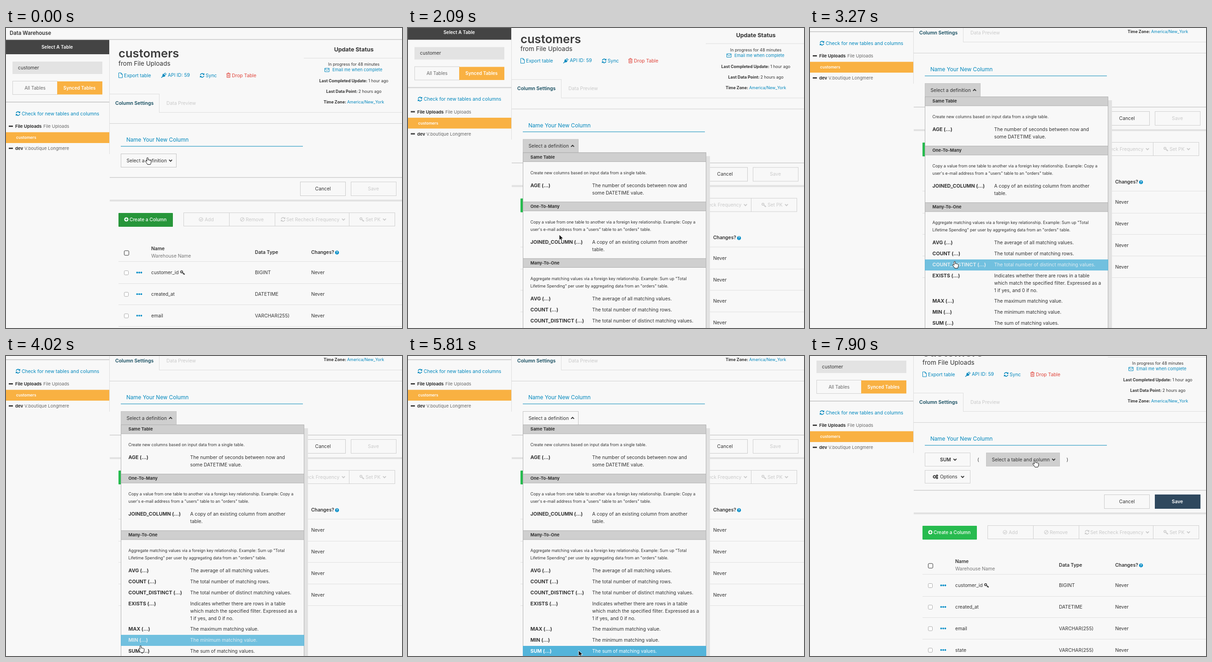
Write an HTML page that moves like this. It is 859x652 px and loops after 8 s.

```html
<!DOCTYPE html>
<html lang="en">
<head>
<meta charset="utf-8">
<title>Column builder</title>
<style>
html, body { margin: 0; width: 100%; height: 100%; overflow: hidden; background: #f8f8f8; }
svg { display: block; width: 859px; height: 652px; font-family: Inter, sans-serif; }
</style>
</head>
<body>
<svg id="stage" viewBox="0 0 859 652"></svg>
<script>
const NS = 'http://www.w3.org/2000/svg';
const INK = '#333', BLUE = '#0087bd', GREY = '#cfcfcf', PALE = '#cacaca', ORANGE = '#f9b142', BG = '#f8f8f8';
const BASE = 10.3, SMALL = 8.8;

let parent = document.getElementById('stage');

function el(tag, attrs, text) {
  const node = document.createElementNS(NS, tag);
  for (const k in attrs) node.setAttribute(k, attrs[k]);
  if (text !== undefined) node.textContent = text;
  parent.appendChild(node);
  return node;
}
function group(draw) {
  const outer = parent, g = el('g', {});
  parent = g;
  draw(g);
  parent = outer;
  return g;
}
// y is the middle of the capitals
function text(x, y, str, o = {}) {
  const size = o.size || BASE;
  return el('text', {
    x, y: y + size * .36, 'font-size': size, 'font-weight': o.bold ? o.bold : 400,
    'text-anchor': o.mid ? 'middle' : 'start', ...(o.inherit ? {} : { fill: o.fill || INK })
  }, str);
}
const rect = (x, y, width, height, fill, stroke = 'none', rx = 0) => el('rect', { x, y, width, height, fill, stroke, rx });
const box = (x, y, w, h, fill = BG, stroke = '#d0d0d0') => rect(x + .5, y + .5, w - 1, h - 1, fill, stroke);
const hline = (x1, x2, y, color = '#ddd', h = 1) => rect(x1, y, x2 - x1, h, color);
const path = (d, stroke, width = 1.2, fill = 'none', x = 0, y = 0) =>
  el('path', { d, stroke, 'stroke-width': width, fill, transform: `translate(${x} ${y})` });

const CHEVRON = { down: 'M-3.2 -1.6L0 1.6L3.2 -1.6', up: 'M-3.2 1.6L0 -1.6L3.2 1.6' };
const chevron = (x, y, color = INK, dir = 'down') => path(CHEVRON[dir], color, 2, 'none', x, y);
function refresh(x, y, color) {
  path('M-4 -.8A4.1 4.1 0 0 1 3.2 -2.6M4 .8A4.1 4.1 0 0 1 -3.2 2.6', color, 1.6, 'none', x, y);
  path('M4.8 -5V-.9H.8zM-4.8 5V.9H-.8z', 'none', 0, color, x, y);
}
function key(x, y, color) {
  el('circle', { cx: x - 2, cy: y - 1.5, r: 2.2, fill: 'none', stroke: color, 'stroke-width': 1.5 });
  path('M0 0L4.8 3.8M2 1.8L.8 3.4M3.6 3L2.6 4.4', color, 1.5, 'none', x, y);
}
function ring(x, y, color, mark) {
  el('circle', { cx: x, cy: y, r: 4, fill: 'none', stroke: color, 'stroke-width': 1.2 });
  path(mark, color, 1.2, 'none', x, y);
}
function gear(x, y, r) {
  el('circle', { cx: x, cy: y, r, fill: 'none', stroke: INK, 'stroke-width': 1.5 });
  el('circle', { cx: x, cy: y, r: r + 1, fill: 'none', stroke: INK, 'stroke-width': 1, 'stroke-dasharray': '1.2 1.2' });
}

function drawSidebar() {
  text(8, 11, 'Data Warehouse', { size: 11.3, bold: 600 });
  hline(0, 859, 24, '#d4d4d4', 2);
  rect(0, 26, 224, 31, '#444');
  text(111, 41, 'Select A Table', { size: 9.9, bold: 600, fill: '#fff', mid: 1 });
  hline(224, 225, 57, '#ddd', 217);
  rect(14, 73, 195, 27, '#e3e3e3');
  text(26, 86, 'customer');
  box(14, 115, 98, 30);
  text(63, 130, 'All Tables', { size: 10, fill: '#666', mid: 1 });
  rect(111, 116, 98, 28.5, ORANGE);
  text(159.5, 130, 'Synced Tables', { size: 9.9, bold: 600, fill: '#fff', mid: 1 });
  hline(0, 224, 160, '#cfcfcf', 2);
  refresh(26, 186, BLUE);
  text(34, 186, 'Check for new tables and columns', { fill: BLUE });
  const source = (y, name, kind, x) => {
    rect(6, y - 2, 9, 3, '#444');
    text(20, y, name, { size: 9.6, bold: 700 });
    text(x, y, kind, { size: 9.6, fill: '#666' });
  };
  source(214, 'File Uploads', 'File Uploads', 81);
  rect(0, 226.5, 224, 23.5, ORANGE);
  text(22, 238, 'customers', { size: 8.5, bold: 600, fill: '#fff' });
  source(262, 'dev', 'V.boutique Longmere', 40);
}

function drawHeader() {
  text(244, 54.8, 'customers', { size: 25.6, bold: 600, fill: '#3c3c3c' });
  text(244, 77, 'from File Uploads', { size: 13.5 });
  path('M.5 .5H5.5L8.5 3.5V11H.5zM5.5 .5V3.5H8.5', BLUE, 1, 'none', 244, 97);
  text(256, 103, 'Export table', { fill: BLUE });
  path('M-5 5L-2 2M1 -3L4 -5.5M3 -1L6 -3.5', BLUE, 1.5, 'none', 342, 103);
  path('M-1 -4L4 1Q1 4 -2 3Q-4 0 -1 -4z', 'none', 0, BLUE, 342, 103);
  text(351, 102, 'API ID: 59', { fill: BLUE });
  refresh(425.5, 103, BLUE);
  text(433, 103, 'Sync', { fill: BLUE });
  const red = '#e0443a';
  path('M0 2.5H9M3 2.5V.5H6V2.5M1.2 2.5V10.5H7.8V2.5M3.4 4.5V8.8M5.6 4.5V8.8', red, 1, 'none', 478, 97);
  text(490, 103, 'Drop Table', { fill: red });

  text(754.5, 47, 'Update Status', { size: 12.4, bold: 700, mid: 1 });
  hline(646, 859, 65);
  text(754.5, 79, 'In progress for 48 minutes', { size: 8.95, mid: 1 });
  path('M.5 .5H10V8H.5zM.5 1.5L5.2 5L10 1.5', BLUE, 1, 'none', 691, 87);
  text(708, 91, 'Email me when complete', { size: 9.2, fill: BLUE });
  const fact = (y, label, value, color = INK) => {
    const t = text(754.5, y, label + ' ', { size: 8.9, bold: 700, mid: 1 });
    const span = document.createElementNS(NS, 'tspan');
    span.setAttribute('font-weight', 400);
    span.setAttribute('fill', color);
    span.textContent = value;
    t.appendChild(span);
  };
  fact(115, 'Last Completed Update:', '1 hour ago');
  fact(138, 'Last Data Point:', '2 hours ago');
  fact(161, 'Time Zone:', 'America/New_York', BLUE);

  hline(225, 333, 143);
  hline(332, 333, 143, '#ddd', 40);
  hline(332, 859, 183);
  text(237, 163, 'Column Settings', { size: 10.45, bold: 600, fill: '#124a5d' });
  text(348, 163, 'Data Preview', { fill: PALE });
  hline(225, 859, 207, '#d0d0d0');
  text(261, 243, 'Name Your New Column', { size: 11.7, fill: BLUE });
  hline(249, 644, 256.5, '#2c9cc4', 1.2);
}

let saveBox, saveText, green;
function drawLower() {
  hline(225, 859, 324, '#d0d0d0', 1.6);
  box(638, 334, 99, 31, BG, PALE);
  text(687.5, 349, 'Cancel', { mid: 1 });
  saveBox = box(748, 334, 99, 31);
  saveText = text(797, 349, 'Save', { mid: 1 });
  hline(225, 859, 373, '#e2e2e2', 4);

  green = rect(244, 402, 118, 30, '#27963a', 'none', 1);
  el('circle', { cx: 261, cy: 416, r: 4.6, fill: '#fff' });
  path('M-2.6 0H2.6M0 -2.6V2.6', '#27a845', 1.6, 'none', 261, 416);
  text(268, 416, 'Create a Column', { size: 10.1, bold: 500, fill: '#fff' });

  for (const [a, b] of [[385, 485], [484, 584], [583, 745], [744, 844]]) box(a, 401, b - a, 30);
  ring(423, 416, PALE, 'M-2 0L-.5 1.6L2.2 -1.6');
  text(431, 416, 'Add', { fill: PALE });
  ring(512.5, 416, PALE, 'M-2.8 2.8L2.8 -2.8');
  text(520, 416, 'Remove', { fill: PALE });
  refresh(601, 416, PALE);
  text(608, 416, 'Set Recheck Frequency', { fill: PALE });
  chevron(732, 416, PALE);
  key(772, 416, PALE);
  text(780, 416, 'Set PK', { fill: PALE });
  chevron(821, 416, PALE);

  rect(256.5, 484, 10, 10, '#fff', '#333', 2);
  text(315, 479, 'Name', { bold: 600 });
  text(315, 495, 'Warehouse Name', { fill: '#777' });
  text(540, 487, 'Data Type', { bold: 600 });
  text(662, 487, 'Changes?', { bold: 600 });
  el('circle', { cx: 718, cy: 488, r: 4.3, fill: '#0a8fc8' });
  text(718, 488, '?', { size: 7, bold: 700, fill: '#fff', mid: 1 });
  hline(244, 859, 507, '#e0e0e0');
  [['customer_id', 'BIGINT'], ['created_at', 'DATETIME'], ['email', 'VARCHAR(255)'], ['state', 'VARCHAR(255)']]
    .forEach(([name, type], i) => {
      const y = 531.5 + i * 46.8;
      rect(256.5, y - 4, 9, 9, '#fff', '#aaa', 2);
      for (const x of [284.5, 289, 293.5]) el('circle', { cx: x, cy: y, r: 1.9, fill: '#0a8fc8' });
      text(315, y, name);
      text(540, y, type);
      text(662, y, 'Never');
      hline(244, 859, Math.round(y + 23), '#e0e0e0');
    });
  key(383, 531.5, INK);
}

const rows = {};
function drawMenu() {
  rect(249.5, 302.5, 397, 540, BG, '#b0b0b0');
  const band = (y, label) => {
    rect(249.5, y + .5, 397, 19.5, GREY, '#b0b0b0');
    text(265.5, y + 10, label, { size: 9.4, bold: 700 });
  };
  const note = (y, ...lines) => lines.forEach((s, i) => text(265.5, y + i * 16, s, { size: SMALL }));
  const row = (top, name, ...lines) => {
    const fill = rect(249, top, 398, 8 + 16 * lines.length, '#53b4da');
    const label = group(() => {
      text(265.5, top + 11.5, name + ' (...)', { size: 10.7, bold: 700, inherit: 1 });
      lines.forEach((s, i) => text(399.5, top + 11.5 + i * 16, s, { inherit: 1 }));
    });
    rows[name] = { fill, label };
  };
  band(302, 'Same Table');
  note(346, 'Create new columns based on input data from a single table.');
  row(362, 'AGE', 'The number of seconds between now and', 'some DATETIME value.');
  band(409, 'One-To-Many');
  note(453, 'Copy a value from one table to another via a foreign key relationship. Example: Copy a',
    'user\'s e-mail address from a "users" table to an "orders" table.');
  row(485, 'JOINED_COLUMN', 'A copy of an existing column from another', 'table.');
  band(532, 'Many-To-One');
  note(576, 'Aggregate matching values via a foreign key relationship. Example: Sum up "Total',
    'Lifetime Spending" per user by aggregating data from an "orders" table.');
  row(608, 'AVG', 'The average of all matching values.');
  row(632, 'COUNT', 'The total number of matching rows.');
  row(656, 'COUNT_DISTINCT', 'The total number of distinct matching values.');
  row(679.5, 'EXISTS', 'Indicates whether there are rows in a table',
    'which match the specified filter. Expressed as a', '1 if yes, and 0 if no.');
  row(735, 'MAX', 'The maximum matching value.');
  row(759, 'MIN', 'The minimum matching value.');
  row(783, 'SUM', 'The sum of matching values.');
}

let lower, chooser, chooserBox, chooserArrow, picked, columnBox, shadow, menu, hand, arrow;
const page = group(() => {
  drawSidebar();
  drawHeader();
  lower = group(drawLower);
  chooser = group(() => {
    chooserBox = box(249, 273, 121, 30, BG, '#c4c4c4');
    text(261.5, 288, 'Select a definition');
    chooserArrow = chevron(357, 288);
  });
  picked = group(() => {
    box(249, 273, 99, 30);
    text(282, 288, 'SUM', { bold: 600 });
    chevron(314.5, 288);
    text(363, 288, '(');
    columnBox = box(382, 273, 160, 30, BG, '#c4c4c4');
    text(394.5, 288, 'Select a table and column');
    chevron(528.5, 288);
    text(556.5, 288, ')');
    box(249, 311, 99, 29);
    gear(270, 325.5, 2.4);
    gear(275.5, 323, 1.2);
    gear(275.5, 328, 1.2);
    text(282, 325.5, 'Options');
    chevron(331, 325.5);
  });
  shadow = rect(257, 310, 398, 540, '#e2e2e2');
  menu = group(drawMenu);
});
hand = path('M-1.5 8V1.2a1.4 1.4 0 0 1 2.8 0V5l1.3-.6 1.4.9 1.3-.3 1.1 1 1.2.2.4 1.6-.6 4-1.2 2.8H0l-1.6-2.6-3-4a1.2 1.2 0 0 1 1.9-1.4z', '#111', 1, '#fff');
arrow = path('M0 0V12.2L2.9 9.6L4.9 14.2L7 13.3L5 8.8H9z', '#fff', .9, '#111');

const TICK = 149, LOOP = 8000;
const track = [ // tick, x, y of the pointer's tip
  [0, 307, 282], [1, 306, 291], [6, 306, 291], [8, 314, 330], [10, 323, 402], [11, 325, 428], [12, 326, 443],
  [13, 326, 443], [14, 328, 449], [17, 328, 449], [18, 328, 457], [19, 324, 467], [21, 317, 485], [23, 311, 530],
  [25, 306, 580], [26, 300, 594], [27, 292, 630], [28, 298, 634], [31, 358, 639], [32, 370, 640], [46, 370, 640],
  [48, 380, 540], [49, 389, 440], [50, 408, 350], [51, 440, 285], [52, 474, 238], [53, 488, 227]
];
const hovers = [['AVG', 19, 21], ['COUNT', 21, 22], ['COUNT_DISTINCT', 22, 23], ['EXISTS', 23, 26],
  ['MAX', 26, 27], ['MIN', 27, 28], ['SUM', 28, 40]];
const handSpans = [[0, 7], [19, 32], [52, 54]];

function pointAt(k) {
  const i = track.findIndex(p => p[0] >= k);
  const b = track[i], a = track[Math.max(0, i - 1)];
  const f = b[0] === a[0] ? 1 : (k - a[0]) / (b[0] - a[0]);
  return [a[1] + (b[1] - a[1]) * f, a[2] + (b[2] - a[2]) * f];
}
const show = (node, on) => node.setAttribute('display', on ? 'inline' : 'none');
const paint = (node, fill) => node.setAttribute('fill', fill);

function render(k) {
  const done = k >= 40, open = k >= 4 && !done;
  const scroll = done ? 63 : k >= 15 ? 153 : k >= 14 ? 31.5 : 0;
  page.setAttribute('transform', `translate(0 ${-scroll})`);
  lower.setAttribute('transform', `translate(0 ${done ? 30 : 0})`);
  show(chooser, !done);
  show(picked, done);
  show(menu, open);
  show(shadow, open && k >= 14);
  paint(chooserBox, k >= 1 && k < 39 ? GREY : BG);
  chooserArrow.setAttribute('d', open ? CHEVRON.up : CHEVRON.down);
  paint(columnBox, k >= 52 ? GREY : BG);
  paint(green, k < 4 ? '#27963a' : k < 5 ? '#27aa45' : '#27bb4f');
  paint(saveBox, done ? '#2f485e' : BG);
  saveBox.setAttribute('stroke', done ? '#2f485e' : '#d0d0d0');
  paint(saveText, done ? '#fff' : PALE);
  saveText.setAttribute('font-weight', done ? 600 : 400);

  const active = hovers.find(h => k >= h[1] && k < h[2]);
  for (const name in rows) {
    const on = active && active[0] === name, fresh = on && k === active[1];
    rows[name].fill.setAttribute('opacity', on ? (fresh ? .82 : 1) : 0);
    paint(rows[name].label, on ? (fresh ? '#e0ecf1' : '#fff') : INK);
  }

  const [x, y] = pointAt(k);
  const isHand = handSpans.some(([a, b]) => k >= a && k < b);
  for (const node of [hand, arrow]) node.setAttribute('transform', `translate(${x} ${y})`);
  show(hand, isHand);
  show(arrow, !isHand);
}

let last = -1;
function frame() {
  const k = Math.min(53, Math.floor((performance.now() % LOOP + 10) / TICK));
  if (k !== last) render(last = k);
  requestAnimationFrame(frame);
}
frame();
</script>
</body>
</html>
```
